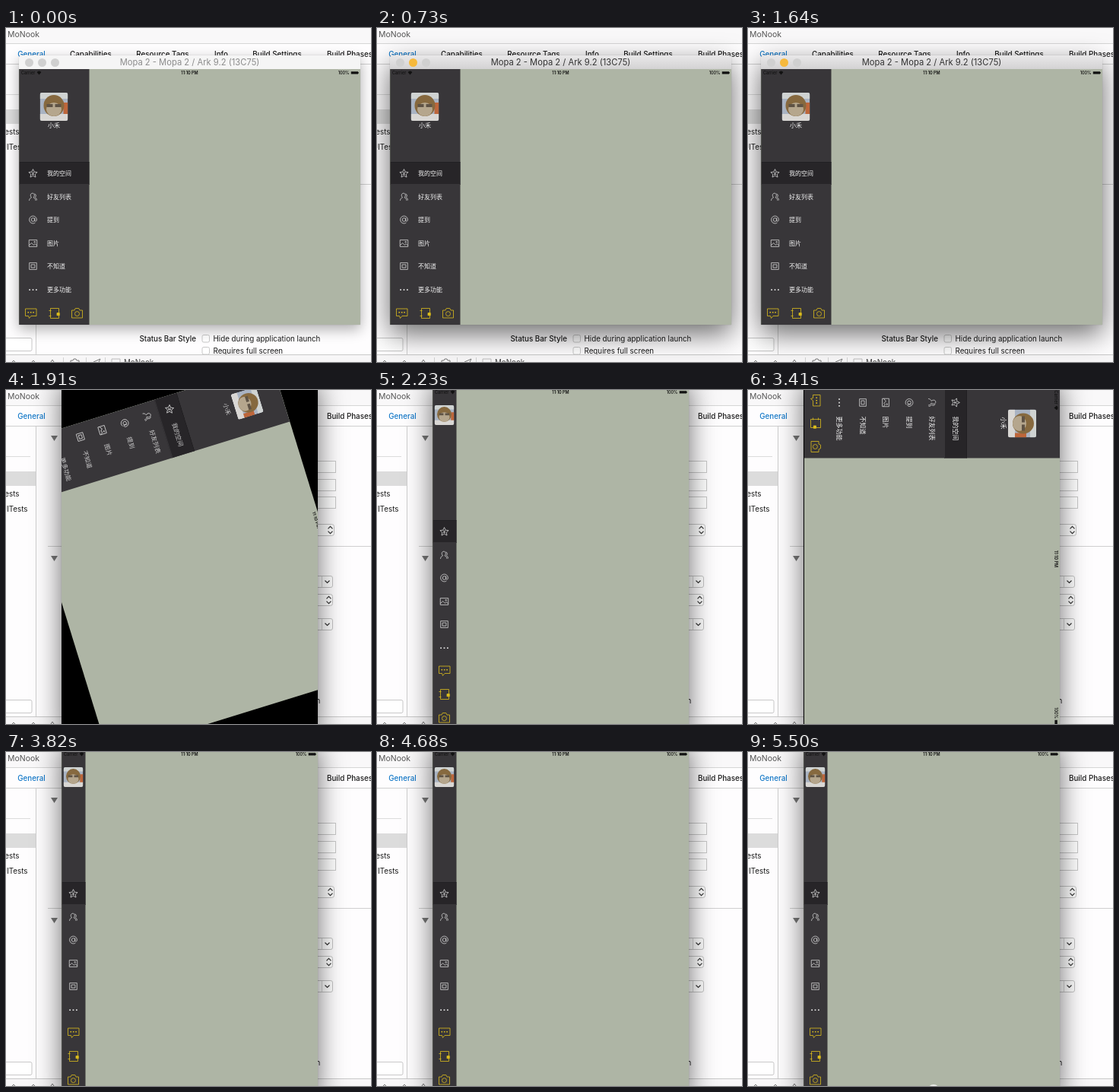
Write an HTML page that moves like this. It is 480 px wide and 439 px high and loops after 5550 ms.

```html
<!DOCTYPE html>
<html lang="en">
<head>
<meta charset="utf-8">
<title>Rotating tablet sidebar</title>
<style>
/* --k: 0 = portrait layout, 1 = landscape layout */
@property --k { syntax: "<number>"; inherits: true; initial-value: 1; }
@property --turn { syntax: "<angle>"; inherits: true; initial-value: 0deg; }

html, body { margin: 0; width: 100%; height: 100%; overflow: hidden; }
body { position: relative; background: #fefdfe; font-family: Inter, Roboto, sans-serif; }
.desk { position: absolute; left: 0; top: 0; }
.desk text { font-size: 9.8px; fill: #1a1a1a; }
.desk .mid { font-weight: 500; }

.win {
  position: absolute; left: 17px; top: 36px; width: 449px; height: 354px;
  border-radius: 4px 4px 0 0;
  animation: shape 5550ms step-end infinite, focus 5550ms step-end infinite;
}
.bar {
  position: relative; height: 18px; border-radius: 4px 4px 0 0; text-align: center;
  font-size: 11.2px; line-height: 18px; white-space: nowrap;
  animation: bar 5550ms step-end infinite;
}
.bar i {
  position: absolute; left: 7.5px; top: 3.5px; width: 11px; height: 11px;
  border-radius: 50%; background: #d0d0d0;
}
.bar i + i { left: 24.5px; animation: lamp 5550ms step-end infinite; }
.bar i + i + i { left: 41.5px; animation: none; }

.screen { position: absolute; inset: 18px 0 0; overflow: hidden; background: #000; }
.view {
  position: absolute; left: 50%; top: 50%; overflow: hidden; background: #aeb5a5;
  width: calc(337px + 112px * var(--k)); height: calc(448px - 112px * var(--k));
  transform: translate(-50%, -50%) rotate(var(--turn));
  animation: spin 5550ms linear infinite;
}
.side {
  position: absolute; left: 0; top: 0; bottom: 0; overflow: hidden; background: #383639;
  width: calc(31px + 61px * var(--k)); color: #f2f2f2;
  font: 8px/1 "Noto Sans CJK SC", "Noto Sans CJK", sans-serif;
}
.face {
  position: absolute; border-radius: 3px; overflow: hidden;
  left: calc(2.5px + 25px * var(--k)); top: calc(22px + 9px * var(--k));
  width: calc(26px + 11px * var(--k)); height: calc(26px + 11px * var(--k));
}
.face svg { display: block; width: 100%; height: 100%; }
.name {
  position: absolute; left: calc(15.5px + 30.5px * var(--k)); top: 74px;
  transform: translate(-50%, -50%); opacity: var(--k); white-space: nowrap;
}
.menu { position: absolute; left: 0; width: 93px; bottom: calc(91.7px - 61px * var(--k)); }
.row { position: relative; height: 30.6px; box-sizing: border-box; }
.row.on { background: #272528; border-bottom: 1px solid #383639; box-shadow: inset 0 .6px #1d1c1e; }
.row span {
  position: absolute; left: 37px; top: 50%; transform: translateY(-50%);
  white-space: nowrap; opacity: var(--k);
}
.icon {
  position: absolute; overflow: visible;
  fill: none; stroke: #d8d8d8; stroke-width: .9; stroke-linejoin: round;
}
.row .icon {
  width: 14px; height: 14px; margin: -7px;
  left: calc(15.5px + 3px * var(--k)); top: 50%;
}
.tool {
  width: 16px; height: 16px; margin: -8px; stroke: #dcbd1c; stroke-width: .8;
  left: calc(15.5px + 30.6px * var(--k) * var(--i));
  bottom: calc(15.5px + 30.6px * (1 - var(--k)) * (2 - var(--i)));
}
.status {
  position: absolute; inset: 0 0 auto; height: 10px; color: #111;
  font: 600 5.5px/10px Inter, Roboto, sans-serif; text-align: center;
}
.status b { position: absolute; top: 0; font-weight: 500; }
.status svg { position: absolute; top: 0; height: 10px; }
.grip {
  position: absolute; left: 236px; top: 436.5px; width: 16px; height: 16px; border-radius: 50%;
  background: #eceeea; opacity: 0; animation: grip 5550ms step-end infinite;
}

@keyframes shape {
  0%, 46.76% { left: 17px; top: 36px; width: 449px; height: 354px; }
  30.72%, 60.09%, 100% { left: 73px; top: -20px; width: 337px; height: 466px; }
}
@keyframes focus {
  0% { box-shadow: 0 0 1px rgba(0,0,0,.35), 0 6px 18px rgba(0,0,0,.32); }
  5.8%, 100% { box-shadow: 0 0 1px rgba(0,0,0,.45), 0 12px 36px rgba(0,0,0,.58); }
}
@keyframes bar {
  0% { background: #f5f5f5; color: #8c8c8c; }
  5.8%, 100% { background: linear-gradient(#e9e8e9, #d3d2d3); color: #333; }
}
@keyframes lamp {
  0% { background: #d0d0d0; }
  5.8%, 100% { background: #f6b93c; }
}
@keyframes spin {
  0%, 30.71% { --k: 1; --turn: 0deg; }
  30.72% { --k: 1; --turn: 90deg; }
  32.25% { --k: 1; --turn: 90deg; animation-timing-function: ease-in-out; }
  39.46%, 46.75% { --k: 0; --turn: 0deg; }
  46.76% { --k: 0; --turn: 90deg; }
  48.2% { --k: 0; --turn: 90deg; animation-timing-function: ease-in-out; }
  55.41%, 60.08% { --k: 1; --turn: 0deg; }
  60.09% { --k: 1; --turn: 90deg; }
  61.53% { --k: 1; --turn: 90deg; animation-timing-function: ease-in-out; }
  68.74%, 100% { --k: 0; --turn: 0deg; }
}
@keyframes grip {
  0% { opacity: 0; }
  98%, 100% { opacity: 1; }
}
</style>
</head>
<body>
<svg class="desk" width="480" height="439">
  <defs>
    <g id="combo">
      <rect x="-60" y=".5" width="79.5" height="15" rx="2.5" fill="#fff" stroke="#c4c4c4"/>
      <path d="M5.5 1v14" stroke="#d5d5d5"/>
      <path d="M9.5 6.5l3 3 3-3" fill="none" stroke="#333" stroke-width="1.2"/>
    </g>
    <g id="updown">
      <rect x="-60" y=".5" width="79.5" height="15" rx="3" fill="#fff" stroke="#c4c4c4"/>
      <path d="M11.5 6.3l3-3 3 3M11.5 9.7l3 3 3-3" fill="none" stroke="#333" stroke-width="1.2"/>
    </g>
  </defs>
  <path d="M0 0h480v20H0z" fill="#f9f8f9"/>
  <path d="M0 20.5h480" stroke="#d6d6d6"/>
  <text x="2" y="12" style="fill:#555;font-size:10.5px">MoNook</text>
  <g class="mid" text-anchor="middle">
    <text x="33.5" y="37.7" style="fill:#1479c8">General</text>
    <text x="111.5" y="37.7">Capabilities</text>
    <text x="206" y="37.7">Resource Tags</text>
    <text x="283" y="37.7">Info</text>
    <text x="356.5" y="37.7">Build Settings</text>
    <text x="452" y="37.7">Build Phases</text>
  </g>
  <path d="M0 47.5h480M39.5 47v382M55 205.5h425" stroke="#cfcfcf" fill="none"/>
  <path d="M0 87.5h32" stroke="#dcdcdc"/>
  <path d="M0 107h39v19H0z" fill="#dcdcdc"/>
  <g text-anchor="end">
    <text x="17.5" y="140.3">MoNookTests</text>
    <text x="28.5" y="160.3">MoNookUITests</text>
  </g>
  <path d="M59 60h9l-4.5 7zM59 218h9l-4.5 7z" fill="#777"/>
  <g fill="#fff" stroke="#c8c8c8">
    <rect x="340" y="93.5" width="93.5" height="15"/>
    <rect x="340" y="117.5" width="93.5" height="15"/>
    <rect x="340" y="140.5" width="93.5" height="15"/>
    <rect x="-8" y="407.5" width="42" height="17" rx="2"/>
    <rect x="258" y="403.5" width="9.5" height="9.5" rx="2"/>
    <rect x="258" y="419.5" width="9.5" height="9.5" rx="2"/>
  </g>
  <use href="#updown" x="412" y="176"/>
  <use href="#combo" x="410" y="244"/>
  <use href="#updown" x="410" y="268"/>
  <use href="#combo" x="410" y="300"/>
  <text class="mid" x="250" y="411.8" text-anchor="end">Status Bar Style</text>
  <text x="272.5" y="411.8">Hide during application launch</text>
  <text x="272.5" y="427.8">Requires full screen</text>
  <path d="M0 429h480v10H0z" fill="#f7f6f7"/>
  <path d="M0 429.5h480" stroke="#c9c9c9"/>
  <path d="M75.5 433v6M105.5 433v6M130.5 433v6" stroke="#d2d2d2"/>
  <g fill="none" stroke="#777">
    <path d="M85 439v-2h3l1-2h3l1 2h3v2M115 439l9-4-2 4M8 439l2-2 2 2M34 439l2-2 2 2M59 439l2-3 2 3"/>
    <path d="M139 439v-4h11v4" stroke="#bbb"/>
  </g>
  <text x="155" y="442.5" style="fill:#444">MoNook</text>
</svg>

<div class="win">
  <div class="bar"><i></i><i></i><i></i>Mopa 2 - Mopa 2 / Ark 9.2 (13C75)</div>
  <div class="screen">
    <div class="view">
      <div class="side">
        <div class="face">
          <svg viewBox="0 0 37 37">
            <path d="M0 0h37v37H0z" fill="#a9b3c2"/>
            <path d="M0 0h37v8H0z" fill="#cfd3d2"/>
            <path d="M31 13h6v16h-6z" fill="#bd663b"/>
            <path d="M0 28h37v9H0z" fill="#d9d7d4"/>
            <ellipse cx="18.5" cy="17" rx="13.5" ry="14" fill="#86693f"/>
            <ellipse cx="18.5" cy="22" rx="10" ry="9" fill="#b5a68d"/>
            <path d="M9 15h8v4H9zM20 15h8v4h-8z" fill="#5f5345"/>
          </svg>
        </div>
        <div class="name">小禾</div>
        <div class="menu">
          <div class="row on"><svg class="icon" viewBox="0 0 16 16"><path d="M8 1.8l1.9 4.1 4.5.5-3.3 3 .9 4.4L8 11.6l-4 2.2.9-4.4-3.3-3 4.5-.5zM6.3 7.2h3.2L6.5 9.8h3.2"/></svg><span>我的空间</span></div>
          <div class="row"><svg class="icon" viewBox="0 0 16 16"><path d="M2.3 13.6c.2-2.8 1.5-3.8 3.4-4.6C3 5.7 4.6 2.5 7.2 2.5s4.2 3.2 1.5 6.5c1.9.8 3.1 1.8 3.3 4.6M10.3 3.3c2.3.7 2.7 3.5 1 5.4 1.5.9 2.3 2.4 2.4 4.3"/></svg><span>好友列表</span></div>
          <div class="row"><svg class="icon" viewBox="0 0 16 16"><circle cx="8" cy="8" r="2.6"/><path d="M10.6 5.2v4c0 2 3 1.600 3-1.2A5.6 5.6 0 1 0 11.3 12.5"/></svg><span>提到</span></div>
          <div class="row"><svg class="icon" viewBox="0 0 16 16"><path d="M2 3h12v10H2zM2 11l4-3.500 3 3 2-1.700 3 2.500"/><circle cx="10.500" cy="6" r=".9"/></svg><span>图片</span></div>
          <div class="row"><svg class="icon" viewBox="0 0 16 16"><path d="M2.500 3h11v10h-11zM5.200 5.700h5.600v4.600H5.200z"/></svg><span>不知道</span></div>
          <div class="row"><svg class="icon" viewBox="0 0 16 16"><path d="M2 8h2M7 8h2M12 8h2" stroke-width="2"/></svg><span>更多功能</span></div>
        </div>
        <svg class="icon tool" style="--i:0" viewBox="0 0 16 16"><path d="M1 2h14.500v9.500H8.500L6 14.500l-1-3H1z"/><path d="M4 6.800h1.600M7.400 6.800H9M10.800 6.800h1.600" stroke-width="1.600"/></svg>
        <svg class="icon tool" style="--i:1" viewBox="0 0 16 16"><path d="M3 1.500h11v13H3zM1 4.500h3M1 11.500h3"/><path d="M11.500 7.500h3.300v3.300h-3.300z" fill="#dcbd1c"/></svg>
        <svg class="icon tool" style="--i:2" viewBox="0 0 16 16"><path d="M1 4h3.500l1.200-2.500h4.600L11.500 4H15v10H1z"/><circle cx="8" cy="8.600" r="3"/></svg>
      </div>
      <div class="status">
        <b style="left:3px">Carrier</b>
        <svg style="left:23px" width="6" viewBox="0 0 6 10"><path d="M0 4q3-3 6 0L3 7.500z" fill="#111"/></svg>
        11:10 PM
        <b style="right:14.500px">100%</b>
        <svg style="right:2px" width="11" viewBox="0 0 11 10"><path d="M0 3.200h9.500v1h1v1.400h-1v1H0z" fill="#111"/></svg>
      </div>
    </div>
  </div>
</div>
<div class="grip"></div>
</body>
</html>
```
